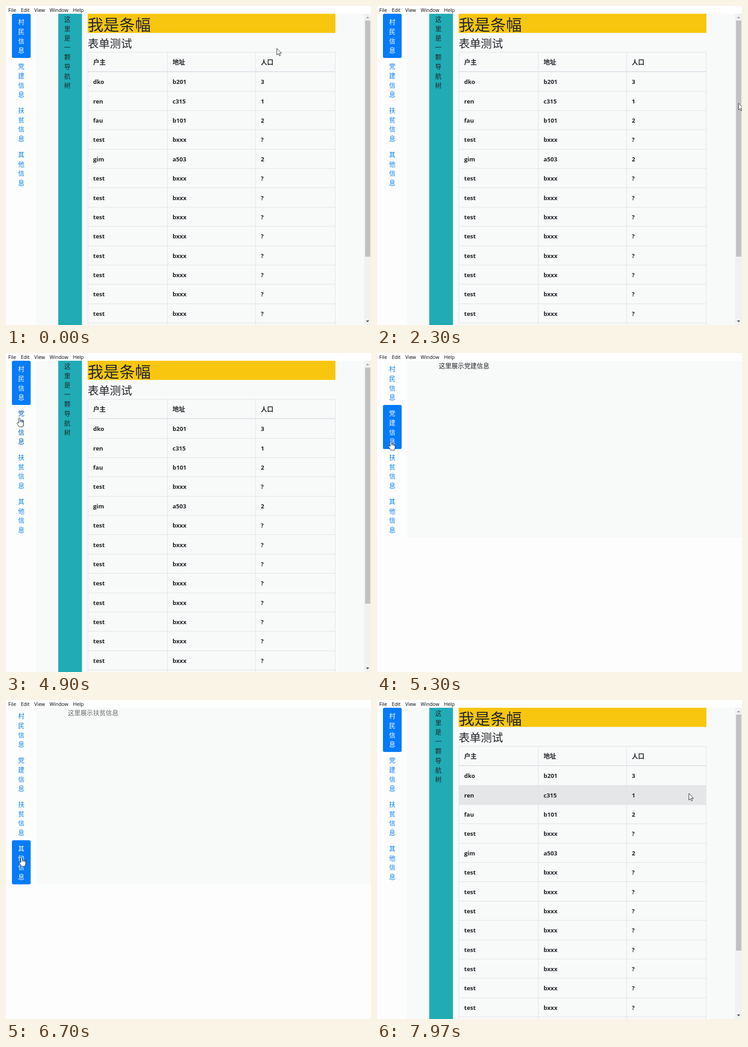
These frames come from a looping animation (800x700 px, 8000 ms). An HTML page:

```html
<!DOCTYPE html>
<html lang="zh-CN">
<head>
<meta charset="utf-8">
<title>村民信息</title>
<style>
html, body { margin: 0; width: 100%; height: 100%; overflow: hidden; background: #fdfdfd; }
svg { display: block; }
text { font: 13.85px "Open Sans", "Noto Sans CJK SC", "Noto Sans CJK", sans-serif; fill: #212529; }
.menu { font-size: 10.8px; fill: #000; }
.mid { text-anchor: middle; }
.h1 { font-size: 34.6px; }
.h3 { font-size: 24.3px; }
.cell { font-size: 13px; font-weight: 700; }
.head { font-weight: 700; }
.tab text { fill: #0a80ee; }
.tab.hover text { fill: #0056b3; }
.tab.active text { fill: #fff; }
.tab rect { fill: none; }
.tab.active rect { fill: #047bf8; }
</style>
</head>
<body>
<svg id="stage" width="800" height="700" viewBox="0 0 800 700"></svg>
<script>
const stage = document.getElementById('stage');

function add(parent, tag, attrs, content) {
  const el = document.createElementNS('http://www.w3.org/2000/svg', tag);
  for (const k in attrs) el.setAttribute(k, attrs[k]);
  if (content) el.textContent = content;
  return parent.appendChild(el);
}
const rect = (p, x, y, width, height, fill) => add(p, 'rect', { x, y, width, height, fill });
const text = (p, x, y, s, cls = '') => add(p, 'text', { x, y, class: cls }, s);
const path = (p, d, fill, stroke = 'none') => add(p, 'path', { d, fill, stroke });
const column = (p, x, y, s) =>
  [...s].forEach((c, i) => text(p, x, y + i * 20.8, c, 'mid'));
const show = (el, on) => el.style.display = on ? '' : 'none';

const BAR = 17, TAB = 96.9;
rect(stage, 0, 0, 800, BAR, '#fff');
const ground = rect(stage, 65, BAR, 735, 683, '#f8f9f9');
let menuX = 5;
for (const s of ['File', 'Edit', 'View', 'Window', 'Help'])
  menuX += text(stage, menuX, 13, s, 'menu').getComputedTextLength() + 10.4;

// Side tabs
const names = ['村民信息', '党建信息', '扶贫信息', '其他信息'];
const tabs = names.map((name, i) => {
  const g = add(stage, 'g', {});
  add(g, 'rect', { x: 13, y: BAR + i * TAB, width: 41, height: TAB, rx: 3.5 });
  column(g, 33.5, 40 + i * TAB, name);
  return g;
});

// Panes: the table page, then three short notes
const panes = names.map((name, i) => {
  const g = add(stage, 'g', {});
  if (i) text(g, 135.5, 33, '这里展示' + name);
  return g;
});
const page = panes[0];
rect(page, 114.5, BAR, 52, 683, '#20abb5');
column(page, 134.5, 33.7, '这里是一颗导航树');
rect(page, 179, BAR, 543, 42, '#f8c60e');
text(page, 179, 53.5, '我是条幅', 'h1');
text(page, 179, 91.3, '表单测试', 'h3');

const ROW = 42.38, TOP = 144.7, COLS = [179, 353, 546.5], RIGHT = 722;
const hover = rect(page, 179, 0, 543, ROW, '#e5e6e7');
const rule = (x, y, w, h) => rect(page, x, y, w, h, '#dee2e6');
rule(179, 101, 543, 1);
rule(179, 143, 543, 2);
[...COLS, RIGHT - 1].forEach(x => rule(x, 101, 1, 599));
const cells = (y, row, cls) => row.split(' ')
  .forEach((s, c) => text(page, COLS[c] + 12, y, s, cls));
cells(128, '户主 地址 人口', 'head');
const people = { 0: 'dko b201 3', 1: 'ren c315 1', 2: 'fau b101 2', 4: 'gim a503 2' };
for (let i = 0; i < 13; i++) {
  cells(171.3 + i * ROW, people[i] || 'test bxxx ?', 'cell');
  rule(179, Math.round(TOP + (i + 1) * ROW - 0.5), 543, 1);
}

// Scroll bar
rect(page, 785, BAR, 15, 683, '#f1f1f1');
rect(page, 787, 32, 11.5, 518, '#c1c1c1');
path(page, 'M789 27l3.5-4 3.5 4z', '#a3a3a3');
path(page, 'M789 690l3.5 4 3.5-4z', '#505050');

const arrow = path(stage, 'M0 0V14.5L3.4 11.4 5.7 16.4 7.9 15.4 5.7 10.6H10.2Z', '#fff', '#222');
const hand = path(stage,
  'M-1.6 12V1.3Q0-1.3 1.6 1.3V6.6Q3.5 5.6 4.6 7.3 6.4 6.6 7.2 8.2 9.3 7.8 9.3 10V14Q9 17 7.5 20H-.5' +
  'Q-2 16.5-5 12.6-4.5 8.5-1.6 12ZM1.6 6.6V10M4.6 7.3V10.4M7.2 8.2V10.8', '#fff', '#222');

// The pointer rests at each stop, then glides to reach the next on time.
const REST = 250, FADE = 150;
const stops = [
  { at: -220, x: 593.5, y: 93 },
  { at: 960, x: 815, y: 45 },
  { at: 3550, x: 815, y: 420 },
  { at: 4720, x: 29, y: 142 },
  { at: 5790, x: 33, y: 285 },
  { at: 6550, x: 34, y: 345 },
  { at: 7540, x: 46, y: 75 },
  { at: 7970, x: 683.5, y: 205 }
];
const clicks = [
  { at: 0, tab: 0 }, { at: 4980, tab: 1 }, { at: 5890, tab: 2 },
  { at: 6650, tab: 3 }, { at: 7785, tab: 0 }
];
const clamp = u => Math.max(0, Math.min(1, u));
const lastBefore = (list, t) => list.filter(e => e.at <= t).length - 1;
const peek = (t, from, to) => 115 * Math.sin(Math.PI * clamp((t - from) / (to - from)));

function pointer(t) {
  const i = lastBefore(stops, t), a = stops[i], b = stops[i + 1] || a;
  const u = clamp((t - a.at - REST) / (b.at - a.at - REST));
  const e = u * u * (3 - 2 * u);
  // two short looks in from the right edge
  const dip = peek(t, 1870, 2330) + peek(t, 2830, 3030);
  return [a.x + (b.x - a.x) * e - dip, a.y + (b.y - a.y) * e];
}

// The table switches at once; the notes fade out, then in.
function view(t) {
  const n = lastBefore(clicks, t);
  const active = clicks[n].tab, old = n ? clicks[n - 1].tab : 0;
  const age = t - clicks[n].at, out = old ? FADE : 0;
  if (age < out) return { active, shown: old, alpha: 1 - age / FADE };
  return { active, shown: active, alpha: active ? clamp((age - out) / FADE) : 1 };
}

function draw(t) {
  const [x, y] = pointer(t);
  const { active, shown, alpha } = view(t);
  const over = x >= 13 && x <= 54 ? Math.floor((y - BAR) / TAB) : -1;
  const onTab = over in tabs;

  tabs.forEach((g, i) => g.setAttribute('class',
    'tab' + (i === active ? ' active' : i === over ? ' hover' : '')));
  panes.forEach((g, i) => show(g, i === shown));
  panes[shown].style.opacity = alpha;
  ground.setAttribute('x', shown ? 67 : 65);
  ground.setAttribute('height', shown ? 4 * TAB : 683);

  const row = Math.floor((y - TOP) / ROW);
  show(hover, x > COLS[0] && x < RIGHT && row >= 0);
  hover.setAttribute('y', TOP + row * ROW);

  show(arrow, !onTab);
  show(hand, onTab);
  (onTab ? hand : arrow).setAttribute('transform', `translate(${x} ${y})`);
}

const begin = performance.now();
function tick() {
  draw((performance.now() - begin) % 8000);
  requestAnimationFrame(tick);
}
tick();
</script>
</body>
</html>
```
